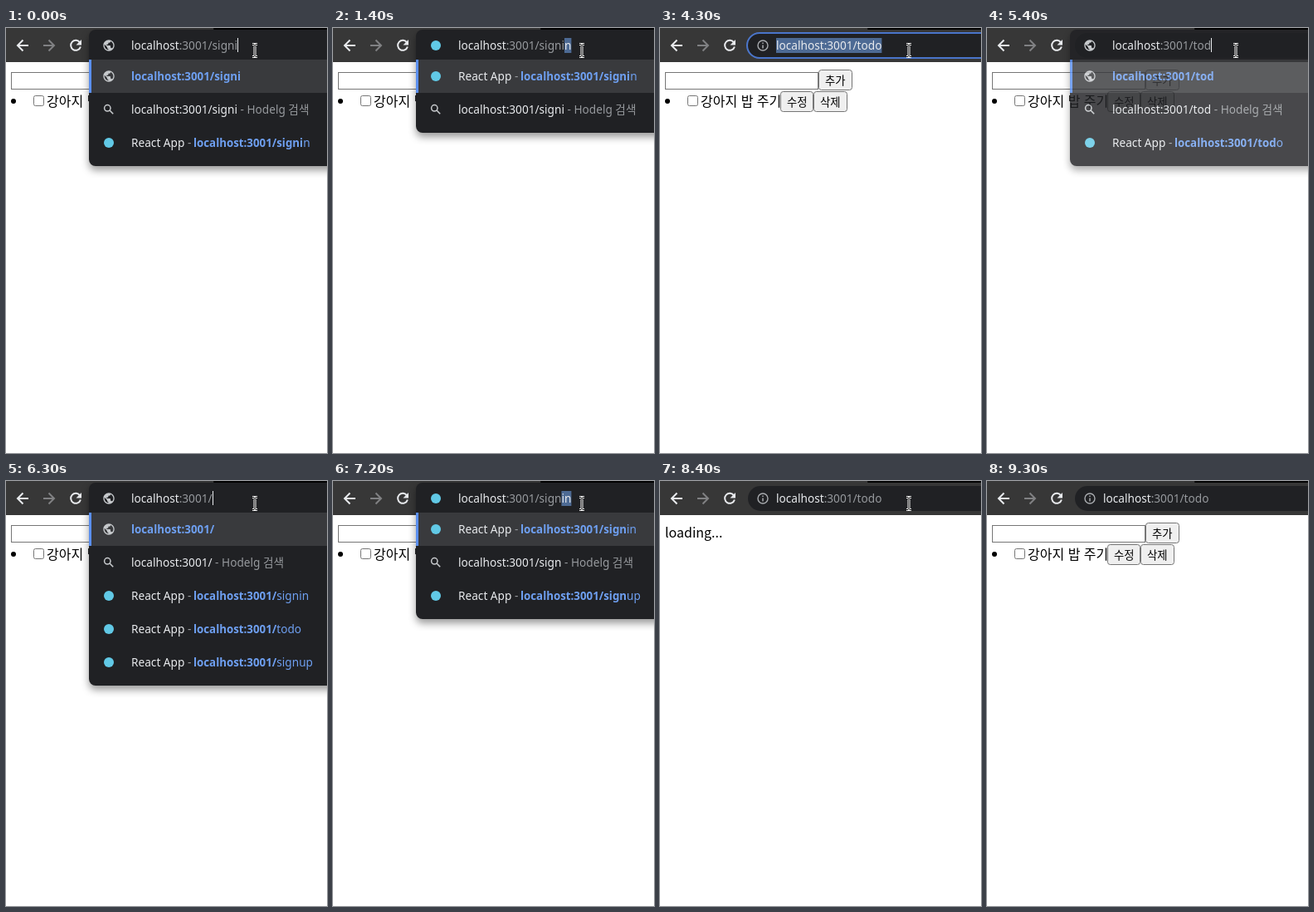
An HTML page for the animation above (9.9 s loop, 387 px wide and 511 px high).

```html
<!DOCTYPE html>
<html lang="ko">
<head>
<meta charset="utf-8">
<style>
  html, body { margin: 0; height: 100%; overflow: hidden; background: #fff; }
  svg { display: block; }
  text { white-space: pre; font: 13.65px "Noto Sans", "Noto Sans CJK KR", sans-serif; }
  .page { font: 16px "Noto Sans CJK KR", "Noto Sans CJK JP", sans-serif; }
  .button { font-size: 13.33px; }
  .bold { font-weight: bold; font-size: 13.3px; }
  .panel { filter: drop-shadow(0 5px 5px rgba(0, 0, 0, .4)); }
</style>
</head>
<body>
<svg id="stage" width="387" height="511" viewBox="0 0 387 511"></svg>
<script>
const stage = document.getElementById('stage');
const pen = document.createElement('canvas').getContext('2d');
pen.font = '13.65px "Noto Sans", sans-serif';

const LOOP = 9900, HOST = 'localhost', PORT = ':3001/';
const LIGHT = '#e8eaed', GRAY = '#96999d', BLUE = '#6e9ff0', DARK = '#202124', MARK = '#4d6a94';
const ROUTES = ['signin', 'todo', 'signup'];

// q: typed path, auto: inline completion, ring: focus ring opacity
const steps = [
  [0, { q: 'signi' }],
  [400, { q: 'sign' }],
  [900, { q: 'sign', blink: true }],
  [1400, { q: 'signi', auto: true }],
  [1600, { q: 'signin', auto: true }],
  [2100, { q: 'signin', auto: true, blink: true }],
  [2600, { q: 'signin', auto: true }],
  [2900, { q: 'signin', auto: true, leaving: true }],
  [3000, { loading: true }],
  [3100, {}],
  [4300, { ring: .85, selected: true }],
  [4400, { ring: .95, selected: true }],
  [4500, { ring: 1, selected: true }],
  [5000, { ring: 1 }],
  [5400, { q: 'tod', fade: .82 }],
  [5600, { q: 'to', fade: .95 }],
  [5700, { q: 'to' }],
  [5900, { q: 't' }],
  [6300, { q: '' }],
  [6700, { q: 's', auto: true }],
  [6900, { q: 'si', auto: true }],
  [7100, { q: 'sig', auto: true }],
  [7200, { q: 'sign', auto: true }],
  [7600, { q: 'signi', auto: true }],
  [7800, { q: 'signin', auto: true }],
  [8300, { q: 'signin', auto: true, leaving: true }],
  [8400, { loading: true }],
  [8500, {}]
];

const width = s => pen.measureText(s).width;
const span = (s, fill, cls = '') => `<tspan fill="${fill}" class="${cls}">${s}</tspan>`;
const text = (x, y, s, cls = '') => `<text x="${x}" y="${y}" class="${cls}">${s}</text>`;
const rect = (x, y, w, h, fill, more = '') =>
  `<rect x="${x}" y="${y}" width="${w}" height="${h}" fill="${fill}" ${more}/>`;
const line = (d, color, w = 2) => `<path d="${d}" fill="none" stroke="${color}" stroke-width="${w}"/>`;
const box = (x, y, w, h, fill, r) =>
  rect(x + .5, y + .5, w - 1, h - 1, fill, `rx="${r}" stroke="#767676"`);

const icons = {
  globe: y => `<path transform="translate(116 ${y - 8}) scale(.6667)" fill="#c6c9cc" d="M12 2C6.48 2 2 6.48 2 12s4.48 10 10 10 10-4.48 10-10S17.52 2 12 2zm-1 17.93c-3.95-.49-7-3.85-7-7.93 0-.62.08-1.21.21-1.79L9 15v1c0 1.1.9 2 2 2v1.93zm6.9-2.54c-.26-.81-1-1.39-1.9-1.39h-1v-3c0-.55-.45-1-1-1H8v-2h2c.55 0 1-.45 1-1V7h2c1.1 0 2-.9 2-2v-.41c2.93 1.19 5 4.06 5 7.41 0 2.08-.8 3.97-2.1 5.39z"/>`,
  search: y => `<circle cx="122.3" cy="${y - 1.7}" r="3.7" fill="none" stroke="#c6c9cc" stroke-width="1.5"/>` +
    line(`M125 ${y + 1}l4.2 4.2`, '#c6c9cc', 1.6),
  info: y => `<circle cx="124" cy="${y}" r="6" fill="none" stroke="#a9acb0" stroke-width="1.4"/>` +
    line(`M124 ${y - 3.4}v1.5m0 1.3v4`, '#a9acb0', 1.5),
  app: y => `<circle cx="124" cy="${y}" r="6" fill="#61c9e6"/>`
};

function button(x, y, w, label) {
  return box(x, y, w, 25, '#efefef', 3) + text(x + 8, y + 18, label, 'page button');
}

function page(s) {
  if (s.loading) return text(6, 68, 'loading...', 'page');
  return box(6, 53, 185, 21, '#fff', 0) + button(191, 50, 41, '추가') +
    '<circle cx="9" cy="88" r="3"/>' + box(33, 81, 13, 13, '#fff', 2) +
    text(49, 94, '강아지 밥 주기', 'page') +
    button(145, 76, 40, '수정') + button(185, 76, 41, '삭제');
}

function toolbar(s) {
  const reload = line('M89.2 17.6A6 6 0 1 0 89.9 22.5', LIGHT) +
    `<path fill="${LIGHT}" d="M91 14v6.5h-6.5z"/>`;
  return rect(0, 0, 387, 41, '#373737') + rect(250, 0, 140, 2, '#000', 'rx="1"') +
    line('M27 21H14.5M20.5 14.5L14 21l6.500 6.500', LIGHT) +
    line('M45 21H57.500M51.500 14.500L58 21l-6.500 6.500', '#808183') +
    (s.leaving ? line('M78.500 15.500l11 11m0-11l-11 11', LIGHT) : reload) +
    rect(106, 6, 300, 30, DARK, 'rx="15"') +
    (s.ring ? rect(105, 6, 300, 30, 'none',
      `rx="15" stroke="#4f82e6" stroke-width="2" opacity="${s.ring}"`) : '');
}

function address(x, path, s) {
  const full = HOST + PORT + path, end = x + width(full);
  const tailAt = x + width(HOST + PORT + (s.q || ''));
  const caret = rect(Math.round(end), 12, 1, 17, LIGHT);
  if (s.selected)
    return rect(x, 12, width(full), 18, MARK) + text(x, 26, span(full, LIGHT));
  const plain = c => text(x, 26, span(HOST, LIGHT) + span(PORT + c, GRAY));
  if (s.q !== undefined && path !== s.q)
    return rect(tailAt, 12, end - tailAt, 18, MARK) + plain(s.q) +
      text(tailAt, 26, span(path.slice(s.q.length), LIGHT));
  const focused = (s.q !== undefined && !s.leaving) || s.ring;
  return plain(path) + (focused && !s.blink ? caret : '');
}

function suggestions(s) {
  const bold = span(HOST + PORT + s.q, BLUE, 'bold');
  const hits = ROUTES.filter(r => r.startsWith(s.q)).map(r => y => icons.app(y) +
    text(151, y + 5, span('React App', LIGHT) + span(' -', GRAY)) +
    text(226, y + 5, bold + span(r.slice(s.q.length), BLUE)));
  const top = s.auto ? hits.shift() : y => icons.globe(y) + text(151, y + 5, bold);
  const find = y => icons.search(y) +
    text(151, y + 5, span(HOST + PORT + s.q, LIGHT) + span(' - Hodelg 검색', GRAY));
  return [top, find, ...hits];
}

function dropdown(s) {
  const rows = suggestions(s), bottom = 46 + 40 * rows.length;
  const path = s.auto ? 'signin' : s.q;
  const icon = s.leaving ? 'info' : s.auto ? 'app' : 'globe';
  return `<g opacity="${s.fade || 1}"><g class="panel">` +
    rect(100, 2, 320, bottom - 2, DARK, 'rx="8"') + '</g>' +
    rect(100, 38, 287, 40, '#393a3d') + rect(100, 38, 3, 40, '#5a8ff0') +
    rows.map((row, i) => row(58 + 40 * i)).join('') + '</g>' +
    icons[icon](21) + address(s.leaving ? 140 : 151, path, s);
}

function pointer(t) {
  const n = t < 9000 ? 0 : Math.floor((t - 9000) / 100) + 1;
  if (n > 3) return '';
  const d = 'M-3 -7.500h2l1 1 1-1h2M0 -6.500v13M-3 7.500h2l1-1 1 1h2';
  return `<g transform="translate(${300 - 56 * n} ${27 - 7 * n})">` +
    line(d, '#fff', 3) + line(d, '#000', 1) + '</g>';
}

function draw(t) {
  const s = steps.findLast(([at]) => at <= t)[1];
  const bar = s.q !== undefined ? dropdown(s) : icons.info(21) + address(140, 'todo', s);
  return page(s) + toolbar(s) + bar + pointer(t);
}

let shown;
function tick() {
  const markup = draw(performance.now() % LOOP);
  if (markup !== shown) stage.innerHTML = shown = markup;
  requestAnimationFrame(tick);
}
tick();
</script>
</body>
</html>
```
